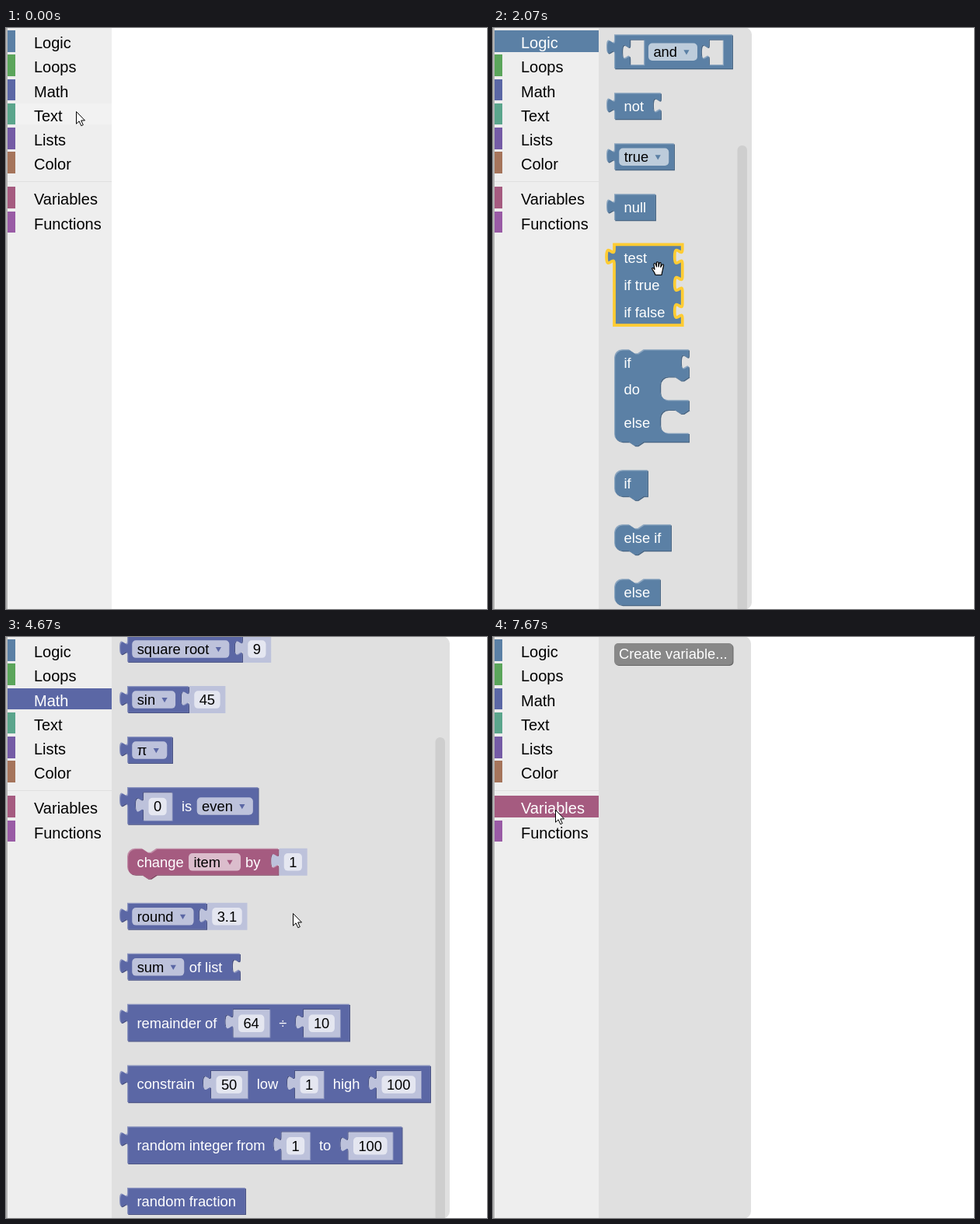
An HTML page that plays this animation: 619 by 747 pixels, repeating every 8 s.

```html
<!DOCTYPE html>
<html lang="en">
<head>
<meta charset="utf-8">
<title>Block toolbox</title>
<style>
  html, body { margin: 0; width: 100%; height: 100%; overflow: hidden; background: #fff; }
  svg { display: block; width: 100vw; height: 100vh; font-family: "Liberation Sans", Arial, sans-serif; }
  .blocks text { font-size: 18.33px; fill: #fff; }
  .blocks text.dark { fill: #000; }
  .menu text { font-size: 20px; }
  path { fill-rule: evenodd; clip-rule: evenodd; }
  .sel { display: none; stroke: #fc3; stroke-width: 3.75; }
  .hover > .sel { display: inline; }
  .hover > .relief { display: none; }
</style>
</head>
<body>
<svg id="stage" viewBox="0 0 619 747"></svg>
<script>
const LOGIC = '#5b80a5', MATH = '#5b67a5', COLOR = '#a5745b', VARS = '#a55b80';
const LEFT = 156, TOP = 7.75, GAP = 30, EDGE = 1.25;
const FRAME = 1000 / 15, LOOP = 8000;

const pen = document.createElement('canvas').getContext('2d');
pen.font = '18.33px "Liberation Sans", Arial, sans-serif';
const textWidth = s => pen.measureText(s).width;

// Blend a hex colour towards grey level "to".
function mix(hex, to, amount) {
  const part = i => Math.round(parseInt(hex.substr(i, 2), 16) * (1 - amount) + to * amount);
  return `rgb(${part(1)},${part(3)},${part(5)})`;
}

// Outline pieces: puzzle tab, stack notch, statement mouth.
const TAB_DOWN = 'c0 12.5-10-10-10 9.375s10-3.125 10 9.375';
const TAB_UP = 'c0-12.5-10 10-10-9.375s10 3.125 10-9.375';
const NOTCH = 'H18.75l7.5 5h3.75l7.5-5';
const NOTCH_BACK = 'l-7.5 5h-3.75l-7.5-5';

const mouth = (x, w, lip) =>
  `H${x + 37.5}${NOTCH_BACK}h-8.75a10 10 0 0 0-10 10v10a10 10 0 0 0 10 10H${w}v${lip}`;
const rowHeight = (b, r) => r === 's' ? 42.5 : b.h;
const bodyHeight = b => [...b.rows].reduce((sum, r) => sum + rowHeight(b, r), 0);
const holeSize = label => label ? [textWidth(label) + 27.2, 36.25] : [18.1, 32.5];

function outline(b) {
  const output = b.conn === 'o';
  let d = output ? 'M0 0' : 'M0 10a10 10 0 0 1 10-10' + (b.conn.includes('p') ? NOTCH : '');
  d += `H${b.w}`;
  [...b.rows].forEach((r, i) => {
    // The shaded edge takes the last bit of the body height.
    const trim = i === b.rows.length - 1 ? EDGE : 0;
    if (r === 's') d += mouth(b.mouth, b.w, 12.5 - trim);
    else if (r === 'v') d += `v6.25${TAB_DOWN}v${b.h - 25 - trim}`;
    else d += `v${b.h - trim}`;
  });
  if (output) d += `H0V25${TAB_UP}z`;
  else d += (b.conn.includes('n') ? `H37.5${NOTCH_BACK}` : '') + 'H10a10 10 0 0 1-10-10z';
  for (const [kind, x, label] of b.items) {
    if (kind !== 'hole') continue;
    const [w, h] = holeSize(label);
    d += `M${x} 6.25v6.25${TAB_DOWN}v${h - 25}h${w}v${-h}z`;
  }
  return d;
}

const text = (x, cy, s, cls = '') => `<text class="${cls}" x="${x}" y="${cy + 6.3}">${s}</text>`;
const rect = (x, y, w, h, fill, more = '') =>
  `<rect x="${x}" y="${y}" width="${w}" height="${h}" fill="${fill}" ${more}/>`;
const swatch = (x, y, fill) => rect(x, y, 32.5, 20, fill, 'rx="5"');

function field(x, cy, label, arrow) {
  const w = textWidth(label) + (arrow ? 32.4 : 13);
  const tip = x + w - 14;
  return rect(x, cy - 11.25, w, 22.5, '#fff', 'fill-opacity=".6" rx="5"') +
    text(x + 6.4, cy, label, 'dark') +
    (arrow ? `<path d="M${tip - 3.6} ${cy - 2.5}h7.2l-3.6 6.2z" fill="${arrow}"/>` : '');
}

function shadow(x, y, label) {
  const paint = label[0] === '#';
  const w = paint ? 45 : textWidth(label) + 26, h = paint ? 32.5 : 35;
  return `<g transform="translate(${x} ${y})">
    <path d="M0 0H${w}V${h}H0V25${TAB_UP}z" fill="${mix(paint ? COLOR : MATH, 255, .6)}"/>
    ${paint ? swatch(6.25, 6.25, label) : field(6.25, 17.5, label)}</g>`;
}

function gear(x, y) {
  return `<g opacity=".85">${rect(x, y, 20, 20, '#1a28e0', 'rx="5" stroke="#d0daf0" stroke-width="1.25"')}
    <g transform="translate(${x + 10} ${y + 10})" fill="none" stroke="#fff">
    <circle r="4.4" stroke-width="2"/><circle r="6.2" stroke-width="2.2" stroke-dasharray="2.6 3.893"/></g></g>`;
}

function item(b, [kind, x, arg, off = 0]) {
  const cy = off + b.h / 2;
  switch (kind) {
    case 'text': return text(x, cy, arg);
    case 'end': return text(x - textWidth(arg), cy, arg);
    case 'field': return field(x, cy, arg);
    case 'drop':
      b.fields.push([x, cy, textWidth(arg) + 32.4]);
      return field(x, cy, arg, b.c);
    case 'hole': return arg ? shadow(x + EDGE, 6.25 + EDGE, arg) : '';
    case 'plug': return shadow(b.w + EDGE, off, arg);
    case 'paint': return swatch(x, 6.25, arg);
    case 'gear': return gear(x, 6.5);
  }
}

let clipCount = 0;
function drawBlock(b) {
  const d = outline(b), id = 'clip' + clipCount++, move = `transform="translate(${EDGE} ${EDGE})"`;
  return `<g class="block" transform="translate(${LEFT} ${b.y})">
    <clipPath id="${id}"><path d="${d}"/></clipPath>
    <g class="relief"><path d="${d}" ${move} fill="${mix(b.c, 0, .2)}"/>
      <path d="${d}" fill="${mix(b.c, 255, .3)}"/>
      <g clip-path="url(#${id})"><path d="${d}" ${move} fill="${b.c}"/></g></g>
    <path class="sel" d="${d}" fill="${b.c}"/>
    ${b.items.map(it => item(b, it)).join('')}</g>`;
}

// Widths are given with the shaded edge included.
const block = (c, w, rows, conn, items, more = {}) =>
  ({ c, w: w - EDGE, rows, conn, items, h: 35, fields: [], ...more });
const logic = (...a) => block(LOGIC, ...a);
const math = (...a) => block(MATH, ...a);
const color = (...a) => block(COLOR, ...a);
const SLIM = { h: 45 }, TALL = { h: 48.75 };

const panels = [
  { row: 0, from: 11, right: 333, bar: 600, travel: 150, scroll: 187, scrollAt: [21, 26], blocks: [
    logic(84, 'vs', 'pn', [['gear', 12.5], ['text', 46, 'if'], ['text', 12.5, 'do', 34.2]], { mouth: 46 }),
    logic(133, 'd', 'o', [['hole', 20], ['drop', 44, '='], ['hole', 102]], SLIM),
    logic(153, 'd', 'o', [['hole', 20], ['drop', 44, 'and'], ['hole', 121.7]], SLIM),
    logic(61, 'v', 'o', [['text', 12.5, 'not']]),
    logic(78, 'd', 'o', [['drop', 6.25, 'true']]),
    logic(54, 'd', 'o', [['text', 12.5, 'null']]),
    logic(89, 'vvv', 'o', [['text', 12.5, 'test'], ['text', 12.5, 'if true', 35], ['text', 12.5, 'if false', 70]]),
    logic(97, 'vss', 'pn', [['text', 12.5, 'if'], ['text', 12.5, 'do', 34.2], ['text', 12.5, 'else', 76.7]], { mouth: 59 }),
    logic(44, 'd', 'n', [['text', 12.5, 'if']]),
    logic(74, 'd', 'pn', [['text', 12.5, 'else if']]),
    logic(60, 'd', 'p', [['text', 12.5, 'else']])
  ] },
  { row: 2, from: 53, right: 571, bar: 622, travel: 128, scroll: 153.4, scrollAt: [62, 68], blocks: [
    math(36, 'd', 'o', [['field', 6.25, '0']]),
    math(172, 'd', 'o', [['hole', 20, '1'], ['drop', 64, '+'], ['hole', 121.5, '1']], TALL),
    math(149, 'v', 'o', [['drop', 6.25, 'square root'], ['plug', 0, '9']]),
    math(80, 'v', 'o', [['drop', 6.25, 'sin'], ['plug', 0, '45']]),
    math(59, 'd', 'o', [['drop', 6.25, 'π']]),
    math(169.5, 'd', 'o', [['hole', 20, '0'], ['text', 70, 'is'], ['drop', 89.7, 'even']], TALL),
    block(VARS, 195.5, 'v', 'pn', [['text', 12.5, 'change'], ['drop', 79, 'item'], ['text', 152, 'by'], ['plug', 0, '1']]),
    math(103, 'v', 'o', [['drop', 6.25, 'round'], ['plug', 0, '3.1']]),
    math(146, 'v', 'o', [['drop', 6.25, 'sum'], ['text', 79.7, 'of list']]),
    math(287, 'd', 'o', [['text', 12.5, 'remainder of'], ['hole', 135.5, '64'], ['text', 195.3, '÷'], ['hole', 226, '10']], TALL),
    math(391, 'd', 'o', [['text', 12.5, 'constrain'], ['hole', 107, '50'], ['text', 166.8, 'low'],
      ['hole', 215, '1'], ['text', 264.7, 'high'], ['hole', 320, '100']], TALL),
    math(354.5, 'd', 'o', [['text', 12.5, 'random integer from'], ['hole', 197.5, '1'], ['text', 247, 'to'], ['hole', 283.5, '100']], TALL),
    math(153, 'd', 'o', [['text', 12.5, 'random fraction']])
  ] },
  { row: 5, from: 92, right: 392, blocks: [
    color(46, 'd', 'o', [['paint', 6.25, '#ff0000']], { h: 32.5 }),
    color(143, 'd', 'o', [['text', 12.5, 'random colour']]),
    color(154.75, 'vvv', 'o', [['end', 131.3, 'colour with red'], ['end', 131.3, 'green', 35], ['end', 131.3, 'blue', 70],
      ['plug', 0, '100'], ['plug', 0, '50', 35], ['plug', 0, '0', 70]]),
    color(151, 'vvv', 'o', [['end', 127.5, 'blend colour 1'], ['end', 127.5, 'colour 2', 35], ['end', 127.5, 'ratio', 70],
      ['plug', 0, '#ff0000'], ['plug', 0, '#3333ff', 35], ['plug', 0, '0.5', 70]])
  ] },
  { row: 6, from: 115, right: 332, blocks: [],
    extra: rect(157, 9, 152.5, 28, '#666', 'rx="5"') + rect(156, 8, 152.5, 28, '#888', 'rx="5"') +
      text(162, 21.5, 'Create variable...') }
];

function drawPanel(p) {
  let y = TOP;
  for (const b of p.blocks) {
    b.y = y;
    y += bodyHeight(b) + (b.conn.includes('n') ? 5 : 0) + GAP;
  }
  return `<g class="panel">${rect(120, -.5, p.right - 120, 748, '#e0e0e0', 'rx="9"')}
    <g class="blocks">${p.blocks.map(drawBlock).join('')}${p.extra || ''}</g>
    ${p.bar ? rect(p.right - 18.5, 1, 12.5, p.bar, '#cecece', 'rx="6" class="bar"') : ''}</g>`;
}

const menu = [['Logic', LOGIC], ['Loops', '#5ba55b'], ['Math', MATH], ['Text', '#5ba58c'], ['Lists', '#745ba5'],
  ['Color', COLOR], ['Variables', VARS], ['Functions', '#995ba5']];

// Menu rows sit on whole pixels.
const rows = menu.map(([name, c], i) => {
  const y = 3 + 31.25 * i + (i > 5 ? 13.9 : 0);
  return { name, c, top: Math.round(y), bottom: Math.round(y + 27.5) };
});
const drawRow = ({ name, c, top, bottom }) => `<g class="row">${rect(2, top, 134, bottom - top, '#f2f2f2')}
  ${rect(2, top, 10, bottom - top, c)}<text x="36" y="${top + 23}">${name}</text></g>`;

const stage = document.getElementById('stage');
stage.innerHTML = panels.map(drawPanel).join('') +
  `<g class="menu">${rect(0, 0, 136, 747, '#eee')}${rect(0, 0, 2, 747, '#b4b4b4')}
   ${rect(2, 197, 134, 1, '#dfdfdf')}${rows.map(drawRow).join('')}</g>
   <g id="pointer" fill="#fff" stroke="#000" stroke-linejoin="round">
   <path id="arrow" d="M.5.5V16.2l3.6-3.4 2.7 5.9 2.5-1.1-2.6-5.7h4.8z"/>
   <path id="hand" stroke-width="1.2" transform="translate(-9 -9)" d="M5 17.5L3.5 14C1 10.5 0 9.5.8 8.8 2 8 3 9 4 10.5L3 4C3 2 5 2 5.5 4l1 3V2C6.5.3 9 .3 9 2v5l1-4.5c.5-1.5 2.5-1.2 2.2.5l-.4 4.5 1.7-3c1-1.3 2.5-.5 2 1l-1 4.5c-.5 3-1 4-1.5 7.5z"/></g>`;

const all = (sel, root = stage) => [...root.querySelectorAll(sel)];
const byId = id => document.getElementById(id);
all('.row').forEach((g, i) => Object.assign(rows[i], { back: g.children[0], label: g.children[2] }));
all('.panel').forEach((g, i) => Object.assign(panels[i], {
  node: g, body: g.querySelector('.blocks'), thumb: g.querySelector('.bar'), nodes: all('.block', g) }));

// Pointer stops: step, x, y.
const route = [[0, 90, 107], [6, 68, 17], [13, 68, 17], [21, 245, 136], [26, 245, 222], [33, 205, 330], [35, 205, 330],
  [48, 83, 77], [56, 83, 77], [62, 244, 139], [69, 374, 357], [82, 84, 240], [83, 83, 227], [87, 84, 172], [91, 84, 172],
  [97, 190, 215], [100, 190, 215], [102, 178, 234], [110, 80, 222], [120, 80, 222]];

const clamp = v => Math.min(1, Math.max(0, v));

function pointerAt(k) {
  const i = route.findIndex(r => r[0] > k);
  const a = route[i - 1], b = route[i];
  const u = (k - a[0]) / (b[0] - a[0]), e = u * u * (3 - 2 * u);
  return [a[1] + (b[1] - a[1]) * e, a[2] + (b[2] - a[2]) * e];
}

function update(time) {
  const k = Math.floor((time % LOOP + 4) / FRAME) % 120;
  const [x, y] = pointerAt(k);
  const open = panels.filter(p => k >= p.from).pop();
  let hand = false;

  for (const p of panels) {
    p.node.style.display = p === open ? 'inline' : 'none';
    if (p !== open) continue;
    const part = p.bar ? clamp((k - p.scrollAt[0]) / (p.scrollAt[1] - p.scrollAt[0])) : 0;
    const shift = part * (p.scroll || 0);
    p.body.setAttribute('transform', `translate(0 ${-shift})`);
    if (p.thumb) p.thumb.setAttribute('y', 1 + part * p.travel);
    p.blocks.forEach((b, i) => {
      const bx = x - LEFT, by = y + shift - b.y;
      const over = bx >= 0 && bx <= b.w && by >= 0 && by <= bodyHeight(b);
      p.nodes[i].classList.toggle('hover', over);
      const inField = b.fields.some(([fx, cy, w]) => Math.abs(bx - fx - w / 2) < w / 2 + 3 && Math.abs(by - cy) < 12);
      if (over && !inField) hand = true;
    });
  }

  rows.forEach((r, i) => {
    const chosen = open && open.row === i;
    const over = x < 136 && y >= r.top && y < r.bottom;
    r.back.setAttribute('fill', chosen ? r.c : over ? '#f2f2f2' : 'none');
    r.label.setAttribute('fill', chosen ? '#fff' : '#000');
  });

  byId('pointer').setAttribute('transform', `translate(${Math.round(x)} ${Math.round(y)})`);
  byId('arrow').style.display = hand ? 'none' : 'inline';
  byId('hand').style.display = hand ? 'inline' : 'none';
}

const start = performance.now();
function tick() {
  update(performance.now() - start);
  requestAnimationFrame(tick);
}
tick();
</script>
</body>
</html>
```
